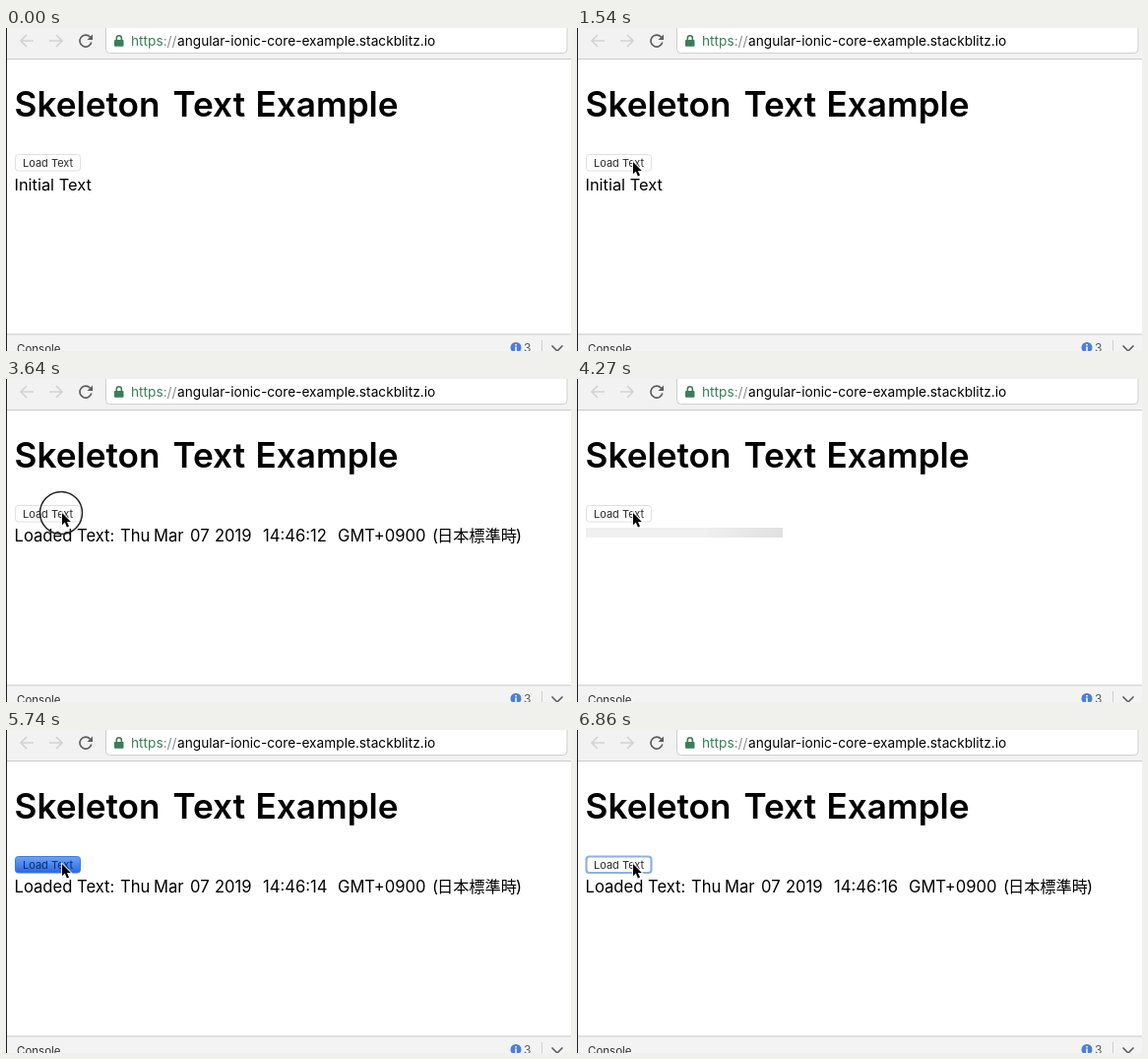
These frames come from a looping animation (574 px wide and 328 px high, 7.63 s). An HTML page:

```html
<!DOCTYPE html>
<html lang="en">
<head>
<meta charset="utf-8">
<title>Skeleton Text Example</title>
<style>
html, body { margin: 0; width: 100%; height: 100%; overflow: hidden; background: #fff; }
svg { display: block; width: 574px; height: 328px; }
text { white-space: pre; font-family: Inter, Roboto, sans-serif; }
.line { fill: none; stroke-width: 1.6; }
</style>
</head>
<body>
<svg viewBox="0 0 574 328">
  <defs>
    <linearGradient id="blue" x2="0" y2="1">
      <stop stop-color="#6ba4f8"/><stop offset="1" stop-color="#2a67e6"/>
    </linearGradient>
    <linearGradient id="shimmer" gradientUnits="userSpaceOnUse" x1="0" x2="800" spreadMethod="repeat">
      <stop offset=".08" stop-opacity=".06"/>
      <stop offset=".18" stop-opacity=".12"/>
      <stop offset=".33" stop-opacity=".06"/>
    </linearGradient>
  </defs>
  <rect width="574" height="328" fill="#fff"/>

  <!-- browser toolbar -->
  <rect width="574" height="31" fill="#f2f2f2"/>
  <rect y="31" width="574" height="1" fill="#cacaca"/>
  <rect x="101.5" y="-5" width="468.5" height="30.5" rx="4" fill="#fff" stroke="#cfcfcf"/>
  <g class="line" stroke="#d2d2d2">
    <path d="M28 13H15M21 7L15 13L21 19"/>
    <path d="M44 13H57M51 7L57 13L51 19"/>
  </g>
  <path class="line" stroke="#5c5c5c" d="M85.5 9.2A6 6 0 1 0 86.8 14.5"/>
  <path fill="#5c5c5c" d="M88 6.5V12H82.5Z"/>
  <rect x="110" y="12" width="9.5" height="6.8" rx="1" fill="#3b7f58"/>
  <path class="line" stroke="#3b7f58" d="M112.3 12V10.2A2.5 2.5 0 0 1 117.3 10.2V12"/>
  <text x="127" y="18" font-size="13.7"><tspan fill="#3b7f58">https</tspan><tspan fill="#8a8a8a">://</tspan><tspan x="174">angular-ionic-core-example.stackblitz.io</tspan></text>

  <!-- page -->
  <text y="89.5" font-size="35.2" font-weight="600"><tspan x="8.5">Skeleton</tspan><tspan x="169.5">Text</tspan><tspan x="253.5">Example</tspan></text>
  <rect id="button" x="9.5" y="128.5" width="66" height="16.5" rx="3"/>
  <text id="label" x="17" y="141" font-size="11">Load Text</text>
  <text id="initial" x="8.5" y="165" font-size="16.4">Initial Text</text>
  <text id="loaded" y="165" font-size="16.6"><tspan x="8.5">Loaded Text:</tspan><tspan x="116">Thu</tspan><tspan x="150">Mar</tspan><tspan x="187">07</tspan><tspan x="212">2019</tspan><tspan x="261" id="clock"></tspan><tspan x="337">GMT+0900</tspan><tspan x="433">(</tspan><tspan x="438" font-size="16.2" font-family="'Noto Sans CJK JP', 'Noto Sans CJK', sans-serif">日本標準時</tspan><tspan x="518">)</tspan></text>
  <rect id="bone" x="9" y="151" width="200" height="10" fill="url(#shimmer)"/>

  <!-- console bar -->
  <rect y="311" width="574" height="17" fill="#f3f3f3"/>
  <rect y="310.5" width="574" height="1" fill="#cacaca"/>
  <g fill="#333">
    <text x="11" y="329.5" font-size="11.5">Console</text>
    <text x="526" y="329" font-size="12" fill="#5c5c5c">3</text>
  </g>
  <circle cx="518" cy="324.5" r="5.5" fill="#4c7fd8"/>
  <path stroke="#fff" stroke-width="1.5" d="M518 321V322.5M518 323.5V328"/>
  <path stroke="#cfcfcf" d="M544.5 317V328"/>
  <path class="line" stroke="#5c5c5c" d="M554.5 322.5L560 328L565.5 322.5"/>
  <rect width="1" height="328" fill="#222"/>

  <circle id="ring" fill="none" stroke="#222" stroke-width="1.5"/>
  <path id="cursor" d="M0 0V12.2L2.8 9.6L4.9 14.4L7 13.5L4.9 8.9H8.8Z" stroke="#fff" stroke-width="1.6" paint-order="stroke"/>
</svg>
<script>
const LOOP = 7630, STEP = 70;
const CLICKS = [[980, 1190], [1610, 1750], [3640, 3780]];
const LOADS = [[1750, 2800, 12], [3710, 4830, 14], [5810, 6860, 16]];
const PRESSES = [[1680, 1750], [5740, 5810]];
const $ = id => document.getElementById(id);
const within = (t, [from, to]) => t >= from && t < to;
const show = (id, on) => $(id).setAttribute("display", on ? "inline" : "none");
const set = (id, attrs) => {
  for (const name in attrs) $(id).setAttribute(name, attrs[name]);
};
const mix = (a, b, k) => a + (b - a) * k;

function pointer(t) {
  if (t < 1400) {
    const k = 1 - (1 - Math.min(1, (t - 420) / 490)) ** 2;
    return [mix(199, 61.5, k), mix(294, 131, k)];
  }
  const k = Math.min(1, (t - 1400) / 140);
  return [mix(61.5, 57, k), mix(131, 136, k)];
}

function drawButton(t) {
  const pressed = PRESSES.some(p => within(t, p));
  const focused = t >= 6860;
  set("button", {
    fill: pressed ? "url(#blue)" : "#fff",
    stroke: pressed ? "#3f78dc" : focused ? "#91afe0" : "#e0e0e0",
    "stroke-width": focused ? 2.2 : 1
  });
  set("label", { fill: pressed ? "#0d2c66" : "#2b2b2b" });
}

function drawText(t) {
  const load = LOADS.find(l => within(t, l));
  const done = LOADS.filter(l => t >= l[1]).pop();
  show("initial", t < LOADS[0][0]);
  show("loaded", done && !load);
  show("bone", load);
  if (done) $("clock").textContent = "14:46:" + done[2];
  if (load) {
    const phase = (t - load[0]) / 1000 % 1;
    set("shimmer", { gradientTransform: `translate(${9 + mix(-468, 468, phase)})` });
  }
}

function drawPointer(t) {
  const [x, y] = pointer(t);
  const click = CLICKS.find(c => within(t, c));
  show("cursor", t >= 420);
  set("cursor", { transform: `translate(${x} ${y})` });
  show("ring", click);
  if (click) set("ring", { cx: x - 1, cy: y, r: t < click[0] + STEP ? 21.5 : 19.5 });
}

function frame(now) {
  const t = Math.floor(now % LOOP / STEP) * STEP;
  drawButton(t);
  drawText(t);
  drawPointer(t);
  requestAnimationFrame(frame);
}
frame(0);
</script>
</body>
</html>
```
